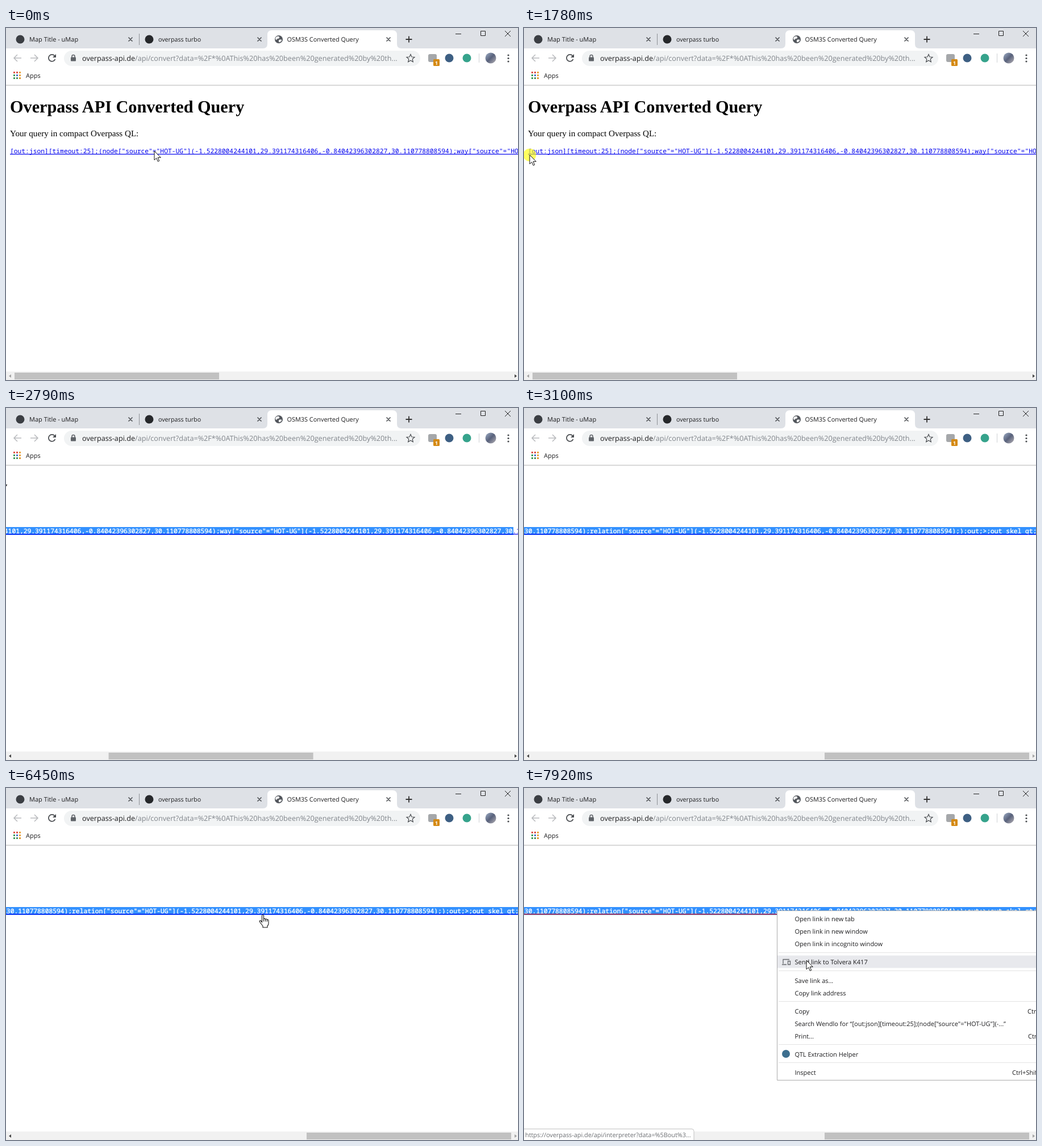
Recreate the animation shown at these times as an HTML page. Size 901x621 px, loop 7990 ms.

```html
<!DOCTYPE html>
<html lang="en">
<head>
<meta charset="utf-8">
<title>Overpass API Converted Query</title>
<style>
html, body { margin: 0; width: 100%; height: 100%; overflow: hidden; background: #fff }
svg { display: block }
text { font-family: "Open Sans", "Noto Sans", sans-serif; font-size: 11px; fill: #1c1c1e; text-rendering: geometricPrecision; white-space: pre }
.serif text { font-family: "Liberation Serif", serif; font-size: 15.12px; fill: #000 }
.serif .title { font-size: 30.24px; font-weight: bold }
text.code { font-family: "Noto Sans Mono", "DejaVu Sans Mono", monospace; font-size: 11.308px; fill: #00e }
text.picked { fill: #fff; stroke: #fff; stroke-width: .35px }
.line { fill: none; stroke: #4a4d51; stroke-width: 1.5 }
</style>
</head>
<body>
<svg width="901" height="621" viewBox="0 0 901 621">
  <defs>
    <linearGradient id="photo" x2="1" y2="1">
      <stop stop-color="#9fb0c8"/><stop offset=".5" stop-color="#59627c"/><stop offset="1" stop-color="#b9b4b8"/>
    </linearGradient>
  </defs>
  <rect width="901" height="621" fill="#fff"/>

  <!-- page -->
  <g id="page">
    <g class="serif">
      <text class="title" x="7" y="149">Overpass API Converted Query</text>
      <text x="7" y="191">Your query in compact Overpass QL:</text>
    </g>
    <text class="code" x="7" y="221"></text>
    <svg id="selection" x="7" y="210" width="0" height="14">
      <rect width="2200" height="14" fill="#3391ff"/>
      <text class="code picked" x="0" y="11"></text>
    </svg>
    <rect id="underline" x="7" y="222" width="2191" height="1.2"/>
  </g>

  <!-- tab strip -->
  <rect width="901" height="36" fill="#dee1e6"/>
  <path d="M452 36q8 0 8-8V12q0-8 8-8H680q8 0 8 8V28q0 8 8 8z" fill="#fff"/>
  <path d="M234.500 10V30" stroke="#8d9095"/>
  <circle cx="25" cy="20" r="7.500" fill="#3b3e43"/>
  <circle cx="252" cy="20" r="7.500" fill="#26282b"/>
  <circle cx="480" cy="20" r="7" fill="#53575d"/>
  <path d="M475 16q5-3 6 0t-4 3q1 3-3 1zM480 21q6-2 5 1t-5 3z" fill="#fff"/>
  <text x="41" y="24">Map Title - uMap</text>
  <text x="268" y="24" style="font-size:10.7px">overpass turbo</text>
  <text x="494.500" y="24" style="font-size:10.9px">OSM3S Converted Query</text>
  <path class="line" d="M215.500 16.500l7 7m0-7l-7 7M442.500 16.500l7 7m0-7l-7 7M669.500 16.500l7 7m0-7l-7 7"/>
  <path class="line" d="M703.500 20h11M709 14.500v11" style="stroke:#333;stroke-width:1.8"/>
  <path class="line" d="M791 10.500h10M835.500 5.500h8v8h-8zM878 5l10 10m0-10l-10 10" style="stroke:#222;stroke-width:1"/>

  <!-- toolbar -->
  <rect y="36" width="901" height="65" fill="#fff"/>
  <rect x="102" y="40" width="627" height="27" rx="13.500" fill="#f1f3f4"/>
  <path class="line" d="M27 53H14m6-6l-6 6 6 6M43 53H56m-6-6l6 6-6 6" style="stroke:#b9bbbe"/>
  <path class="line" d="M85.500 49a6 6 0 1 0 1 6" style="stroke-width:1.8"/>
  <path d="M88 46v6h-6z" fill="#4a4d51"/>
  <rect x="114" y="51.500" width="9" height="7" rx="1" fill="#5f6368"/>
  <path class="line" d="M116 52v-2a2.500 2.500 0 0 1 5 0v2" style="stroke:#5f6368"/>
  <text x="134" y="58" style="font-size:12.65px">overpass-api.de<tspan fill="#80858b">/api/convert?data=%2F*%0AThis%20has%20been%20generated%20by%20th...</tspan></text>
  <path class="line" d="M712 46.500l2 4.500 5 .5-3.800 3.300 1.100 5-4.300-2.600-4.300 2.600 1.100-5-3.800-3.300 5-.5z" style="stroke-width:1.2"/>
  <rect x="743" y="46" width="15" height="14" rx="3" fill="#a5a7aa"/>
  <rect x="752" y="55" width="11" height="12" rx="1.500" fill="#d58a13"/>
  <text x="755" y="64.500" style="font-size:8.5px;font-weight:bold;fill:#fff">1</text>
  <circle cx="780" cy="53" r="7.500" fill="#3d5f83"/>
  <circle cx="811" cy="53" r="7.500" fill="#36a38c"/>
  <path d="M832.500 45V61" stroke="#cfd1d4"/>
  <circle cx="853" cy="53" r="9.500" fill="url(#photo)"/>
  <g fill="#4a4d51"><circle cx="884" cy="48" r="1.600"/><circle cx="884" cy="53.500" r="1.600"/><circle cx="884" cy="59" r="1.600"/></g>
  <g id="apps"></g>
  <text x="35" y="87.500">Apps</text>
  <rect y="100.500" width="901" height="1" fill="#b4b4b4"/>

  <!-- scroll bar and status -->
  <rect y="606" width="901" height="15" fill="#f1f1f1"/>
  <rect id="thumb" y="608" width="360" height="12" fill="#c1c1c1"/>
  <path id="left" d="M9 611v6l-4-3z"/>
  <path id="right" d="M895 611v6l4-3z"/>
  <g id="status">
    <path d="M-1 601.500H295q4 0 4 4V622H-1z" fill="#fff" stroke="#c2c2c2"/>
    <text x="2" y="616" style="font-size:10.85px;fill:#6a6d71">https://overpass-api.de/api/interpreter?data=%5Bout%3...</text>
  </g>

  <g id="menu">
    <path d="M902 216.500H445.500V515.500H902" fill="#fff" stroke="#ababab"/>
    <rect id="hover" x="446" width="455" height="22" fill="#e8e9ed"/>
    <path d="M448 290.500H901M448 322.500H901M448 376.500H901M448 452.500H901M448 484.500H901" stroke="#e3e3e3"/>
    <path class="line" d="M456 310V302.500H467M454 311.500H462M464.500 305.500h4v6h-4z" style="stroke:#65686c;stroke-width:1.3"/>
    <circle cx="461" cy="469" r="7" fill="#3d6f8f"/>
    <g id="items"></g>
  </g>

  <g id="pointer">
    <circle id="click" r="11.300" fill="#ff0" opacity=".62"/>
    <path id="arrow" d="M0 0V16L3.700 12.500 6.300 18.500 8.700 17.400 6.200 11.600H11.300z" fill="#fff" stroke="#111"/>
    <g id="hand" fill="#fff" stroke="#111" stroke-width="1.100" stroke-linejoin="round">
      <path d="M-1.500 13V1.500q0-2 1.500-2t1.500 2V7q1.500-1.500 3 .5 1.800-1.200 2.900.8 2.600-.8 2.600 2V15q0 2.500-2 4.500V22H0V19.500L-5.300 12.500q-1.200-2 .3-2.500t3.500 3z"/>
      <path d="M1.500 7v4.500M4.500 7.500v4M7.400 8.300v3.400" fill="none"/>
    </g>
  </g>
</svg>
<script>
const LOOP = 7990, CHAR = 6.785, MAX_SCROLL = 1294;
const $ = id => document.getElementById(id);
const show = (id, on) => $(id).setAttribute("opacity", +on);

const area = '["source"="HOT-UG"](-1.5228004244101,29.391174316406,-0.84042396302827,30.110778808594);';
const query = "[out:json][timeout:25];(" + ["node", "way", "relation"].map(k => k + area).join("") + ");out;>;out skel qt;";
document.querySelectorAll(".code").forEach(e => e.textContent = query);

// label, row centre, shortcut, shortcut x
const items = [
  ["Open link in new tab", 231], ["Open link in new window", 253], ["Open link in incognito window", 275],
  ["Send link to Tolvera K417", 307], ["Save link as...", 340], ["Copy link address", 362],
  ["Copy", 394, "Ctrl+C", 886], ["Search Wendlo for “[out:json][timeout:25];(node[\"source\"=\"HOT-UG\"](-...”", 416],
  ["Print...", 438, "Ctrl+P", 887], ["QTL Extraction Helper", 470], ["Inspect", 502, "Ctrl+Shift+I", 859]
];
$("items").innerHTML = items.map(([s, y, key, x]) =>
  `<text x="476.500" y="${y + 4}">${s}</text>` + (key ? `<text x="${x}" y="${y + 4}">${key}</text>` : "")).join("");

const dots = ["#e2574c", "#d9534a", "#e8a33d", "#3f9d5a", "#4a6fd0", "#e8a33d", "#3f9d5a", "#4a8f62", "#e0952f"];
$("apps").innerHTML = dots.map((c, i) =>
  `<rect x="${13 + i % 3 * 5}" y="${77 + Math.floor(i / 3) * 5}" width="3" height="3" fill="${c}"/>`).join("");

// busy stretches: start, end, number of steps
const stretches = [[0, 1, 1], [70, 150, 2], [330, 770, 7], [940, 1240, 5], [1620, 1620, 1], [1780, 2550, 11],
  [2630, 3100, 7], [4660, 5350, 10], [6050, 6670, 9], [6820, 7050, 4], [7370, 7370, 1], [7690, 7920, 4]];

// pointer tip: time, x, y
const path = [[0, 261, 217], [70, 257, 218], [150, 254, 218], [330, 240, 218], [550, 100, 217], [770, 2, 214],
  [940, 2, 216], [1240, 3, 222.5], [1620, 3, 222.5], [1780, 10, 224], [2050, 160, 229], [2319, 450, 233],
  [2550, 784, 231], [2630, 882, 228], [2700, 915, 228], [4650, 915, 228], [4660, 875, 228], [5000, 660, 243],
  [5350, 477, 253], [6050, 475, 250], [6437, 452, 224], [6670, 450, 217], [7370, 450, 217],
  [7690, 456, 229], [7920, 497, 304]];
const scrolling = [[2630, 0], [2708, 190], [2786, 415], [3100, MAX_SCROLL]];
const statusFade = [[400, 0], [620, 1], [1010, 1], [1240, 0], [6820, 0], [6970, 1]];

function stepTime(t) {
  const [start, end, n] = stretches.filter(s => s[0] <= t).pop();
  if (n === 1) return start;
  const dt = (end - start) / (n - 1);
  return start + dt * Math.min(n - 1, Math.floor((t - start) / dt + 1e-6));
}

function at(track, t, i = 1) {
  const k = track.findIndex(p => p[0] > t);
  if (k < 0) return track[track.length - 1][i];
  if (!k) return track[0][i];
  const a = track[k - 1], b = track[k];
  return a[i] + (b[i] - a[i]) * (t - a[0]) / (b[0] - a[0]);
}

function draw(now) {
  const t = stepTime(now % LOOP);
  const x = at(path, t), y = at(path, t, 2), scroll = at(scrolling, t);
  const atEnd = scroll >= MAX_SCROLL - .5;

  $("page").setAttribute("transform", `translate(${-scroll})`);
  $("thumb").setAttribute("x", 15 + 514 * scroll / MAX_SCROLL);
  $("left").setAttribute("fill", scroll ? "#444" : "#a3a3a3");
  $("right").setAttribute("fill", atEnd ? "#a3a3a3" : "#444");

  let picked = 0;
  if (t >= 1780) picked = atEnd ? query.length : Math.floor((Math.min(x, 893) + scroll - 7) / CHAR);
  $("selection").setAttribute("width", picked * CHAR);
  $("underline").setAttribute("fill", t >= 6820 ? "#e00000" : "#00e");
  show("status", at(statusFade, t));

  show("menu", t >= 7370);
  const row = t >= 7690 && items.find(r => Math.abs(r[1] - y) <= 11);
  show("hover", !!row);
  if (row) $("hover").setAttribute("y", row[1] - 11.5);

  const hand = t >= 70 && t < 690 || t >= 6350 && t < 7370;
  $("pointer").setAttribute("transform", `translate(${x} ${y})`);
  show("hand", hand);
  show("arrow", !hand);
  show("click", (t >= 1620 && t < 3100 || t >= 6820 && t < 7040) && .62);
}

const begin = performance.now();
(function tick() {
  draw(performance.now() - begin);
  requestAnimationFrame(tick);
})();
</script>
</body>
</html>
```
